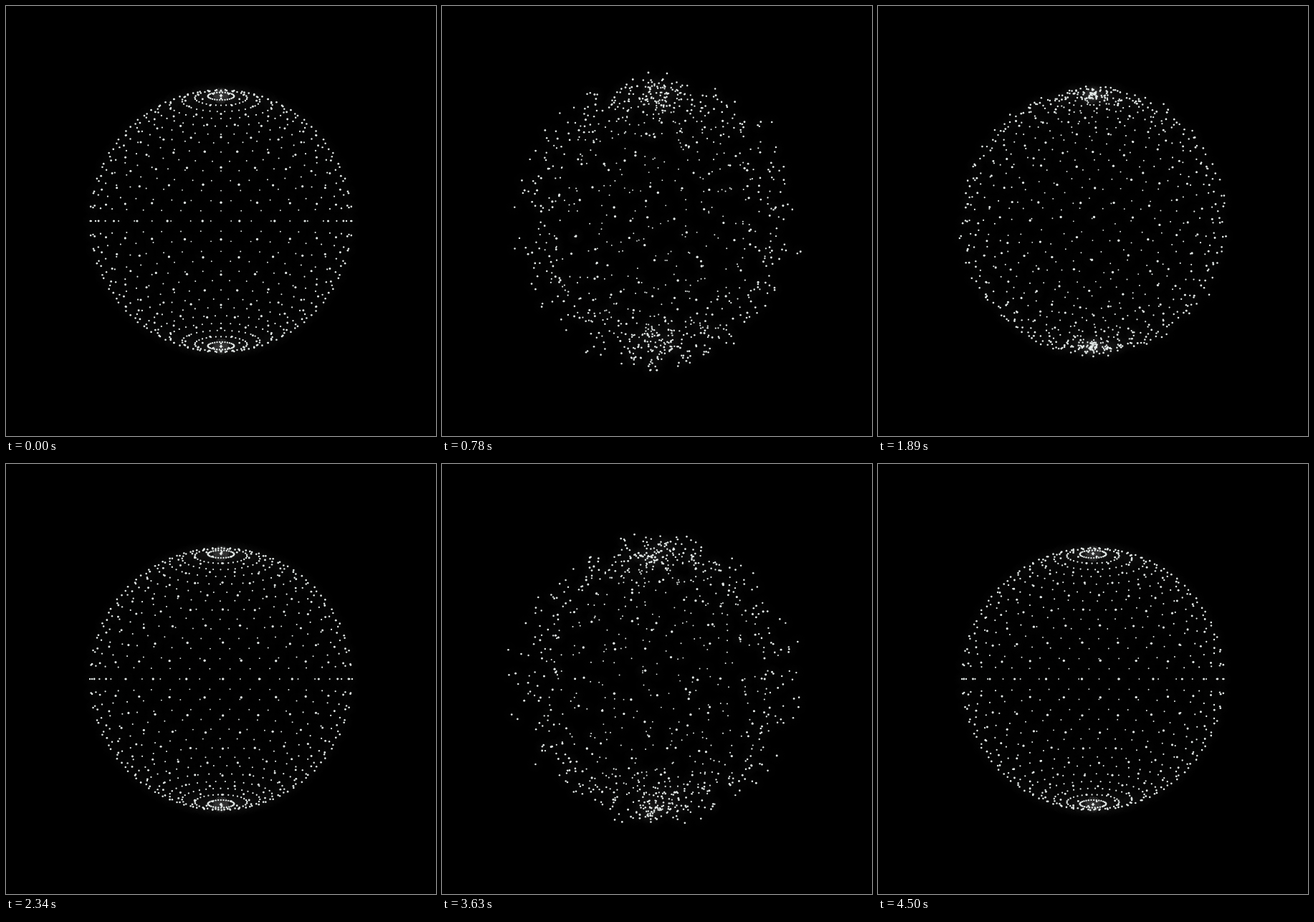
An HTML page with a canvas that plays this animation: 600x600 px, repeating every 4530 ms.

```html
<!DOCTYPE html>
<html lang="en">
<head>
<meta charset="utf-8">
<title>Dot sphere</title>
<style>
html, body { margin: 0; width: 100%; height: 100%; overflow: hidden; background: #000; }
canvas { display: block; width: 600px; height: 600px; }
</style>
</head>
<body>
<canvas id="stage" width="600" height="600"></canvas>
<script>
const LOOP = 4530, STEP = 30;
const R = 175, CAMERA = 600, MID = 300;
const ROWS = 30, PER_ROW = 30;
const TAU = Math.PI * 2;
const ctx = document.getElementById('stage').getContext('2d');

// Scatter strength in px over time, one list per burst
const BURSTS = [
  [[30, 0], [270, 58], [570, 38], [780, 21], [1470, 11], [2280, 0]],
  [[2340, 0], [2610, 56], [2910, 43], [3270, 31], [3630, 19], [3810, 13], [4380, 0]]
];

function seeded(seed) {
  return () => {
    seed = (seed + 0x6D2B79F5) | 0;
    let v = Math.imul(seed ^ (seed >>> 15), 1 | seed);
    v = (v + Math.imul(v ^ (v >>> 7), 61 | v)) ^ v;
    return ((v ^ (v >>> 14)) >>> 0) / 4294967296;
  };
}

const rand = seeded(29);
const offset = () => [0, 0, 0].map(() => rand() * 2 - 1);

// Rings every 6 degrees, each second ring shifted by half a gap
const dots = [];
for (let i = 0; i <= ROWS; i++) {
  const polar = Math.PI * i / ROWS;
  for (let j = 0; j < PER_ROW; j++) {
    const lon = TAU * (j + (i % 2) / 2) / PER_ROW;
    dots.push({
      x: R * Math.sin(polar) * Math.sin(lon),
      y: -R * Math.cos(polar),
      z: R * Math.sin(polar) * Math.cos(lon),
      push: BURSTS.map(offset)
    });
  }
}

// Faint halo that only shows where dots crowd together
const HALO = 15;
const halo = document.createElement('canvas');
halo.width = halo.height = HALO * 2;
const hctx = halo.getContext('2d');
const fade = hctx.createRadialGradient(HALO, HALO, 0, HALO, HALO, HALO);
fade.addColorStop(0, 'rgba(255,255,255,0.009)');
fade.addColorStop(1, 'rgba(255,255,255,0)');
hctx.fillStyle = fade;
hctx.fillRect(0, 0, HALO * 2, HALO * 2);

function strength(keys, t) {
  for (let k = 1; k < keys.length; k++) {
    const [t0, a] = keys[k - 1], [t1, b] = keys[k];
    if (t >= t0 && t <= t1) {
      let p = (t - t0) / (t1 - t0);
      if (k === 1) p = 1 - (1 - p) ** 2;
      return a + (b - a) * p;
    }
  }
  return 0;
}

function draw(t) {
  const s = t / LOOP;
  const turn = -TAU * s + 0.0105 * Math.sin(Math.PI * s);
  const c = Math.cos(turn), n = Math.sin(turn);
  const b = t < 2310 ? 0 : 1;
  const amp = strength(BURSTS[b], t);

  ctx.globalCompositeOperation = 'source-over';
  ctx.fillStyle = '#000';
  ctx.fillRect(0, 0, 600, 600);

  const seen = dots.map(d => {
    const [dx, dy, dz] = d.push[b];
    const x = d.x + dx * amp, y = d.y + dy * amp, z = d.z + dz * amp;
    const scale = CAMERA / (CAMERA - (z * c - x * n));
    return [MID + (x * c + z * n) * scale, MID + y * scale, scale];
  });

  ctx.globalCompositeOperation = 'lighter';
  for (const [x, y] of seen) ctx.drawImage(halo, x - HALO, y - HALO);

  ctx.globalCompositeOperation = 'source-over';
  ctx.fillStyle = '#e4eae8';
  for (const [x, y, scale] of seen) {
    ctx.beginPath();
    ctx.arc(x, y, 1.2 * scale, 0, TAU);
    ctx.fill();
  }
}

function tick() {
  const t = performance.now() % LOOP;
  draw(Math.floor(t / STEP) * STEP);
  requestAnimationFrame(tick);
}
tick();
</script>
</body>
</html>
```
